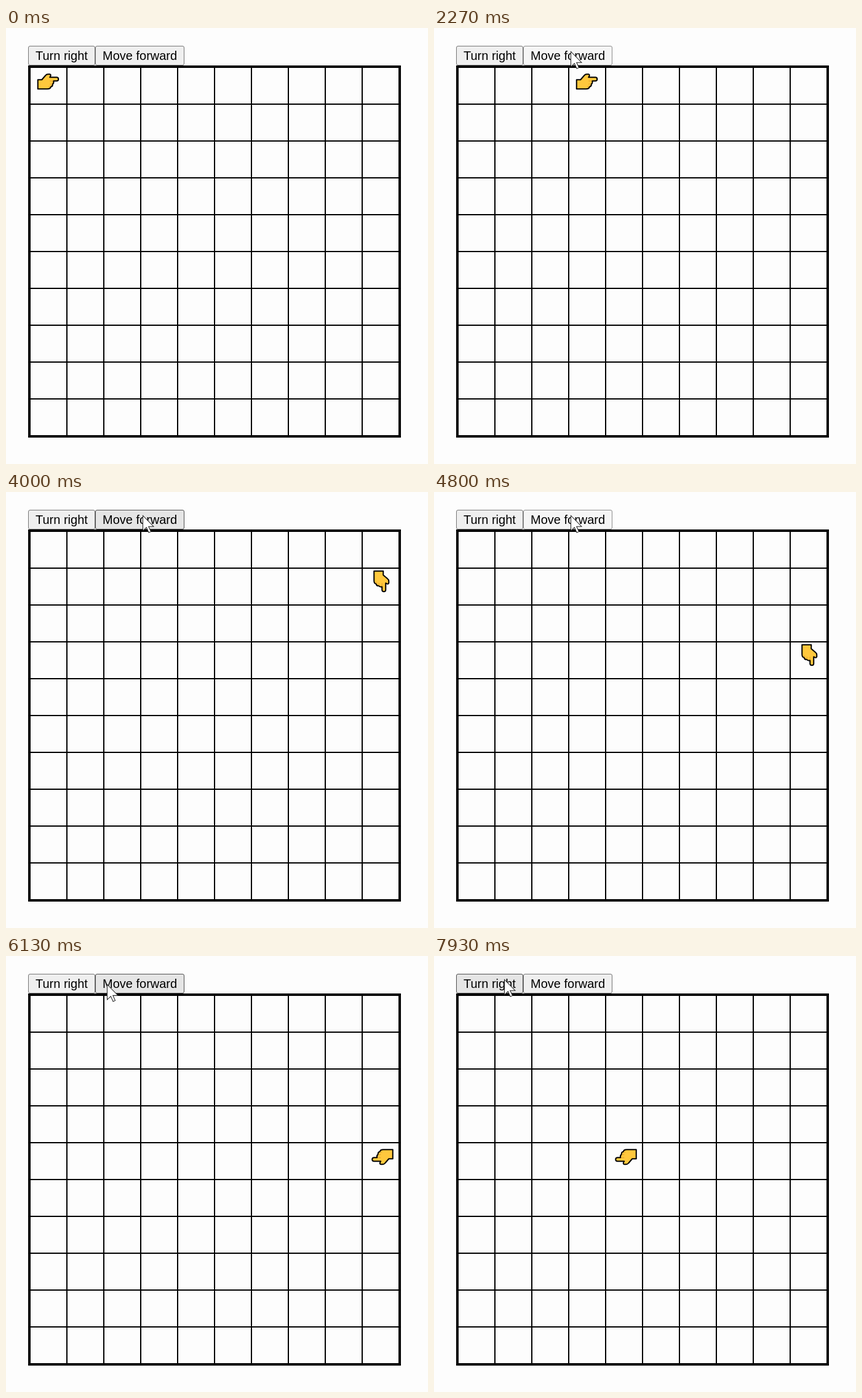
Recreate the animation shown at these times as an HTML page. Size 686x710 px, loop 8000 ms.

```html
<!DOCTYPE html>
<html lang="en">
<head>
<meta charset="utf-8">
<title>Grid robot</title>
<style>
  html, body { margin: 0; height: 100%; overflow: hidden; background: #fdfdfd; }
  svg { display: block; }
  text { font: 20px "Liberation Sans", Arial, sans-serif; }
  .button { fill: #efefef; stroke: #767676; }
  .button.hover { fill: #e5e5e5; stroke: #4f4f4f; }
  .button.active { fill: #f5f5f5; stroke: #8d8d8d; }
</style>
</head>
<body>
<svg width="686" height="710" viewBox="0 0 686 710">
  <rect class="button" x="36.5" y="29.5" width="108" height="31" rx="2.5"/>
  <rect class="button" x="145.5" y="29.5" width="144" height="31" rx="2.5"/>
  <text x="48" y="52">Turn right</text>
  <text x="157" y="52">Move forward</text>
  <rect x="38" y="63" width="602" height="602" fill="none" stroke="#000" stroke-width="4"/>
  <path id="lines" stroke="#000" stroke-width="2"/>
  <g id="hand" stroke-linejoin="round">
    <path fill="#ffc83d" stroke="#000" stroke-width="2" d="M-18.5 -3H-12L-6 -10Q-4.5 -12 -2 -12H1Q4 -11 1 -7H12Q15 -7 15 -4Q15 -1 12 -1H7Q8 3 5.5 4Q6 8 2.5 8.5Q2 12 -3 12H-18.5Z"/>
    <path fill="none" stroke="#e19d2e" d="M1 -1H6M1 4H5M-1 8H2"/>
  </g>
  <path id="cursor" fill="#fff" stroke="#222" stroke-width=".7" d="M0 0V17L4 13.2L6.6 19L9 18L6.4 12.2H12Z"/>
</svg>
<script>
const LOOP = 8000, CELL = 60, SIZE = 10, PRESS = 70;
const $ = id => document.getElementById(id);
const buttons = [...document.querySelectorAll('.button')];

// Runs of clicks: first release, count, interval
const clicks = [[1730, 7, 200], [3270, 3, 200], [4000, 4, 290], [5670, 1, 0], [6730, 5, 200]]
  .flatMap(([first, count, gap]) => Array.from({ length: count }, (_, i) => first + i * gap));

// Pointer moves: start, end, x, y
const moves = [[400, 1270, 222, 38], [4930, 5470, 118, 46], [5870, 6200, 170, 46], [7600, 7930, 114, 38]];

let grid = '';
for (let i = 1; i < SIZE; i++)
  grid += `M${39 + i * CELL} 63v602M38 ${64 + i * CELL}h602`;
$('lines').setAttribute('d', grid);

function pointer(t) {
  let x = 112, y = 712;
  for (const [start, end, toX, toY] of moves) {
    const u = Math.min(1, Math.max(0, (t - start) / (end - start)));
    const ease = u * u * (3 - 2 * u);
    x += (toX - x) * ease;
    y += (toY - y) * ease;
  }
  return [x, y];
}

// Index of the button under the pointer, or -1
function hit([x, y]) {
  if (y < 29 || y > 61 || x < 36 || x > 290) return -1;
  return x < 145 ? 0 : 1;
}

// Moving forward at an edge turns right instead
function robot(t) {
  let col = 0, row = 0, dir = 0;
  for (const up of clicks.filter(up => up <= t)) {
    const c = col + [1, 0, -1, 0][dir], r = row + [0, 1, 0, -1][dir];
    const free = Math.min(c, r) >= 0 && Math.max(c, r) < SIZE;
    if (hit(pointer(up)) === 1 && free) [col, row] = [c, r];
    else dir = (dir + 1) % 4;
  }
  return { col, row, dir };
}

function draw(now) {
  // Fifteen pictures per second, times rounded to 10 ms
  const t = Math.round(Math.floor((now % LOOP) * 0.015 + 0.1) * 20 / 3) * 10;
  const { col, row, dir } = robot(t);
  const at = pointer(t), over = hit(at);
  const down = clicks.some(up => t >= up - PRESS && t < up);
  buttons.forEach((b, i) => {
    b.classList.toggle('hover', i === over && !down);
    b.classList.toggle('active', i === over && down);
  });
  $('hand').setAttribute('transform',
    `translate(${70.25 + col * CELL} ${87.25 + row * CELL}) rotate(${dir * 90})`);
  $('cursor').setAttribute('transform',
    `translate(${at.map(v => Math.round(v) + 0.5)}) scale(1.45)`);
}

let start;
function tick(now) {
  start ??= now;
  draw(now - start);
  requestAnimationFrame(tick);
}
draw(0);
requestAnimationFrame(tick);
</script>
</body>
</html>
```
